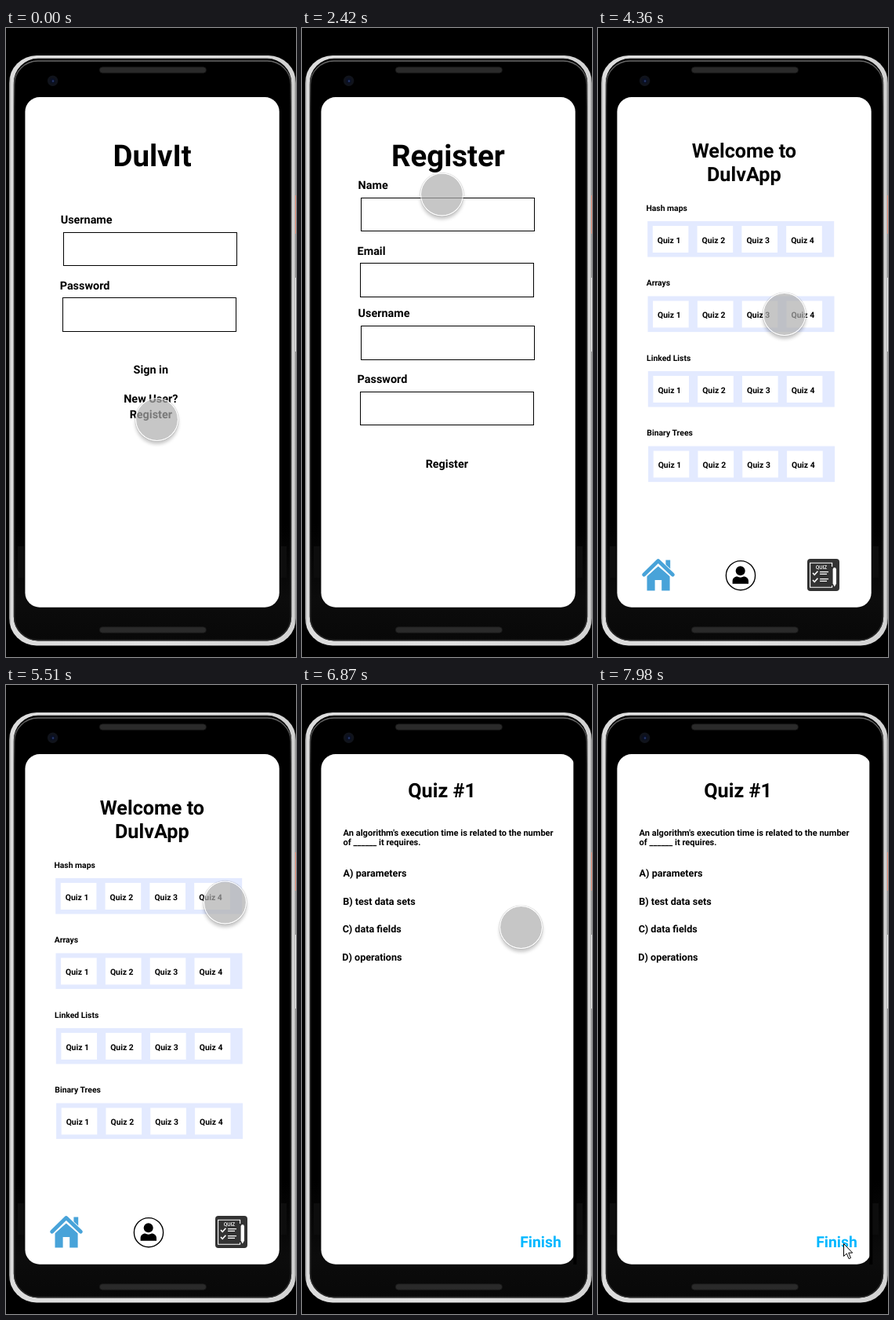
Animation, 370 px wide and 801 px high, one loop 8000 ms. Source, as an HTML page:

```html
<!DOCTYPE html>
<html lang="en">
<head>
<meta charset="utf-8">
<title>Quiz app walkthrough</title>
<style>
  html, body { margin: 0; width: 100%; height: 100%; overflow: hidden; background: #000; }
  svg { position: absolute; left: 0; top: 0; display: block; }
  text { font-family: Roboto, Arial, sans-serif; font-weight: 700; text-rendering: geometricPrecision; white-space: pre; }
  .page { visibility: hidden; }
  .page.on { visibility: visible; }
  #touch {
    position: absolute; left: 0; top: 0; width: 55px; height: 55px; box-sizing: border-box;
    border-radius: 50%; border: 1.2px solid rgba(255,255,255,.9);
    background: rgba(174,174,174,.7); background-clip: padding-box;
    box-shadow: 0 0 1px rgba(0,0,0,.6), 0 4px 4px rgba(0,0,0,.22);
  }
  #touch.down {
    background: rgba(172,172,172,.76); background-clip: padding-box;
    border-color: rgba(225,225,225,.9); box-shadow: 0 0 1px rgba(0,0,0,.5);
  }
</style>
</head>
<body>
<svg width="370" height="801" viewBox="0 0 370 801">
  <defs>
    <linearGradient id="rim" x1="0" y1="0" x2="1" y2="0">
      <stop offset="0" stop-color="#8a8a8a"/>
      <stop offset=".007" stop-color="#dcdcdc"/>
      <stop offset=".5" stop-color="#e2e2e2"/>
      <stop offset=".993" stop-color="#d2d2d2"/>
      <stop offset="1" stop-color="#8a8a8a"/>
    </linearGradient>
    <linearGradient id="body" x1="0" y1="0" x2="0" y2="1">
      <stop offset=".8" stop-color="#000"/>
      <stop offset=".93" stop-color="#0c0c0c"/>
      <stop offset="1" stop-color="#080808"/>
    </linearGradient>
    <linearGradient id="glint" x1="0" y1="0" x2="0" y2="1">
      <stop offset="0" stop-color="#666"/>
      <stop offset=".08" stop-color="#2a2a2a"/>
      <stop offset="1" stop-color="#2a2a2a"/>
    </linearGradient>
  </defs>

  <!-- phone -->
  <rect width="370" height="801"/>
  <rect x="4" y="35" width="366" height="751.5" rx="35" fill="url(#rim)"/>
  <rect x="9.8" y="38.8" width="354.4" height="741.6" rx="31" fill="url(#body)"/>
  <rect x="10.6" y="42" width="352.8" height="737.6" rx="30" fill="none" stroke="url(#glint)" stroke-width="1.5"/>
  <rect x="369" y="213" width="1" height="49" fill="#e88f78"/>
  <rect x="369" y="318" width="1" height="94" fill="#eee"/>
  <path d="M15 660h8v40h-8zM350 660h8v40h-8z" fill="#0d0d0d"/>
  <g fill="#2a2a2a" stroke="#1a1a1a" stroke-width=".8">
    <rect x="119.4" y="49.8" width="136" height="7.4" rx="3.7"/>
    <rect x="119.4" y="762.8" width="136" height="7.4" rx="3.7"/>
  </g>
  <circle cx="59.6" cy="67.2" r="6.7" fill="#10131b"/>
  <circle cx="59.6" cy="67.2" r="3.4" fill="#0a1024"/>
  <circle cx="60" cy="67.6" r="1.3" fill="#26366a"/>

  <rect x="24.4" y="88" width="324.3" height="649.7" rx="18.5" fill="#fff"/>
  <g id="pages"></g>
  <path id="arrow" d="M313.5 711.5v16l3.7-3.5 2.9 6.6 2.4-1-2.8-6.5h5z" fill="#fff" stroke="#000" stroke-width="1" stroke-linejoin="round"/>
</svg>
<div id="touch"></div>

<script>
const LOOP = 8000, TICK = 135, ARROW_AT = 7980;

const text = (s, x, y, size, attrs = '') => `<text x="${x}" y="${y}" font-size="${size}" ${attrs}>${s}</text>`;
const mid = (s, x, y, size) => text(s, x, y, size, 'text-anchor="middle"');
const rect = (x, y, w, h, attrs) => `<rect x="${x}" y="${y}" width="${w}" height="${h}" ${attrs}/>`;
const list = (n, make) => Array.from({ length: n }, (_, i) => make(i)).join('');

// two labelled inputs; the lower one sits a pixel to the left
const fieldPair = (labels, x, y) => list(2, i => {
  const fx = x - i, fy = y + i * 83.6;
  return text(labels[i], fx - 3.7, fy - 11.1, 14.4) +
    rect(fx, fy, 221.2, 42.7, 'fill="none" stroke="#000" shape-rendering="crispEdges"');
});

const login = () =>
  mid('DulvIt', 186.6, 176.2, 38.4) +
  fieldPair(['Username', 'Password'], 73.4, 260.2) +
  mid('Sign in', 184.8, 439.6, 14.4) +
  mid('New User?', 184.8, 476.6, 14.4) +
  mid('Register', 184.8, 497, 14.4);

const register = () =>
  mid('Register', 186.4, 176.2, 38.4) +
  fieldPair(['Name', 'Email'], 75.3, 216) +
  fieldPair(['Username', 'Password'], 75.3, 379.5) +
  mid('Register', 184.8, 560.3, 14.4);

const quizRow = (label, i) => {
  const dy = i * 95.5, dx = i * .3;
  return text(label, 61.4 + dx, 232.8 + dy, 10.4) +
    rect(63.2 + dx, 246 + dy, 238, 45.6, 'fill="#e3eaff"') +
    list(4, n => {
      const x = 69.8 + dx + n * 56.8;
      return rect(x, 252 + dy, 45.6, 34, 'fill="#fff"') + text(`Quiz ${n + 1}`, x + 6, 273.6 + dy, 10.4);
    });
};

const house = `
  <g fill="#48a3d9">
    <path d="M86.4 677.5h5.8v12h-5.8z"/>
    <path d="M62.5 698L76.8 685.5 91.6 698v18.6H81.2v-13.6h-8.6v13.6H62.5z"/>
    <path d="M58.6 696.8L76.8 679.3 95.4 696.8" fill="none" stroke="#fff" stroke-width="7.4"/>
    <path d="M58.6 696.2L76.8 678.6 95.4 696.2" fill="none" stroke="#48a3d9" stroke-width="4.8" stroke-linecap="round" stroke-linejoin="round"/>
  </g>`;

const person = `
  <circle cx="182" cy="697.2" r="18.6" fill="#fff" stroke="#000" stroke-width="1.4"/>
  <circle cx="181.7" cy="691.2" r="6"/>
  <path d="M171.6 707.8v-3.2c0-3.6 2.6-6 6-6 2.4 1.4 6 1.4 8.2 0 3.6 0 6.2 2.4 6.2 6v3.2z"/>`;

const checkLine = i => `<g transform="translate(0 ${694 + i * 9})">
  <path d="M274 0l2.2 2.4 4.2-4.6" stroke-width="1.6"/><path d="M283-1.4h11M283 1.4h9"/></g>`;

const quizIcon = rect(267, 676, 41, 41, 'rx="4" fill="#333"') +
  `<g fill="none" stroke="#fff" stroke-width="1.1"><path d="M298.6 686v-4.8h-28v31h28V710"/>${list(2, checkLine)}</g>
   <path d="M299.6 689.5q0-2.5 2.2-2.5t2.2 2.5v18l-2.2 4-2.2-4z" fill="#fff"/>` +
  text('QUIZ', 285, 688.8, 6.6, 'text-anchor="middle" fill="#fff" style="font-weight:500"');

const home = () =>
  mid('Welcome to', 186.4, 164.6, 25.2) +
  mid('DulvApp', 186.3, 194.6, 25.2) +
  ['Hash maps', 'Arrays', 'Linked Lists', 'Binary Trees'].map(quizRow).join('') +
  house + person + quizIcon;

const quiz = () =>
  rect(346.3, 88, 4, 650, '') +
  mid('Quiz #1', 178.6, 143.4, 25.2) +
  text('An algorithm\'s execution time is related to the number', 52.6, 191.5, 11.07) +
  text('of ______ it requires.', 52.6, 204.3, 11.07) +
  ['parameters', 'test data sets', 'data fields', 'operations']
    .map((s, i) => text(`${'ABCD'[i]}) ${s}`, 52.6 - i * .45, 244.4 + i * 35.5, 12.6)).join('') +
  text('Finish', 278.2, 716, 19.4, 'fill="#00b7ff"');

// each page: when it appears, and the press that opens it
const pages = [
  { make: login, at: 0 },
  { make: register, at: 1440, press: 680, release: 1990 },
  { make: home, at: 3680, press: 3680, release: 4090 },
  { make: quiz, at: 6330, press: 6100, release: 6870 }
];

// first step, last step, destination
const moves = [
  [140, 680, 186.5, 490.3],
  [2120, 2420, 178.5, 212],
  [2550, 2690, 221.5, 500],
  [2820, 3080, 188.5, 559.5],
  [4230, 4490, 262.5, 267],
  [4770, 4920, 284.5, 277.6],
  [5190, 5510, 279.5, 277],
  [6870, 6870, 279.5, 308.5],
  [7030, 7030, 254.5, 390],
  [7150, 7280, 283.5, 609],
  [7430, 7430, 326.5, 690],
  [7560, 7840, 313.5, 712.5]
];

// the pointer advances in equal jumps, one per tick
function pointerAt(t) {
  let x = 192.5, y = 498.5;
  for (const [first, last, toX, toY] of moves) {
    if (t < first) break;
    const jumps = Math.round((last - first) / TICK);
    const done = t >= last ? jumps : Math.floor((t - first) / (last - first) * jumps);
    const p = (done + 1) / (jumps + 1);
    x += (toX - x) * p;
    y += (toY - y) * p;
  }
  return [x, y];
}

const holder = document.getElementById('pages');
holder.innerHTML = pages.map(p => `<g class="page">${p.make()}</g>`).join('');
const pageEls = [...holder.children];
const touch = document.getElementById('touch');
const arrow = document.getElementById('arrow');

function draw(t) {
  const current = pages.filter(p => p.at <= t).length - 1;
  pageEls.forEach((el, i) => el.classList.toggle('on', i === current));

  const [x, y] = pointerAt(t);
  touch.style.transform = `translate(${x - 27.5}px, ${y - 27.5}px)`;
  touch.classList.toggle('down', pages.some(p => t >= p.press && t < p.release));

  const pointing = t >= ARROW_AT;
  touch.style.visibility = pointing ? 'hidden' : 'visible';
  arrow.style.visibility = pointing ? 'visible' : 'hidden';
}

const start = performance.now();
function tick() {
  draw((performance.now() - start) % LOOP);
  requestAnimationFrame(tick);
}
tick();
</script>
</body>
</html>
```
